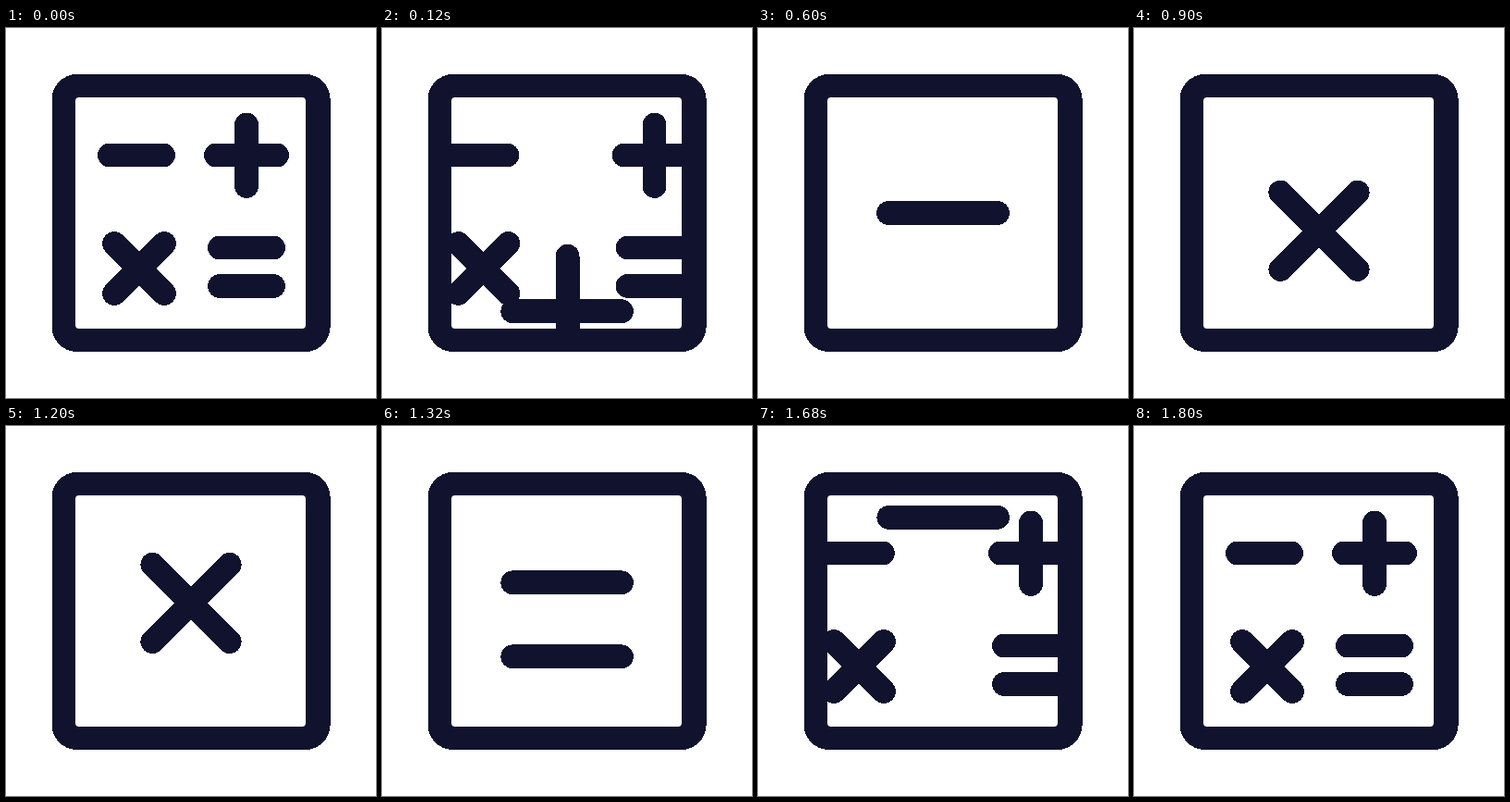
Write an HTML page that moves like this. It is 400 by 400 pixels and loops after 1830 ms.

```html
<!DOCTYPE html>
<html lang="en">
<head>
<meta charset="utf-8">
<title>Calculator icon</title>
<style>
  html, body { margin: 0; width: 100%; height: 100%; overflow: hidden; background: #fff; }
  svg { display: block; width: 100%; height: 100%; shape-rendering: crispEdges; }
  path { fill: none; stroke: #11132e; stroke-width: 25.8; stroke-linecap: round; }
</style>
</head>
<body>
<svg viewBox="0 0 400 400">
  <clipPath id="inside"><rect x="75" y="75" width="249" height="250" rx="4"/></clipPath>
  <rect x="49.6" y="50" width="301" height="300" rx="27" fill="#11132e"/>
  <g clip-path="url(#inside)">
    <rect width="400" height="400" fill="#fff"/>
    <path id="left" d="M112 137.5H170M117 233l54 54M171 233l-54 54"/>
    <path id="right" d="M227 137.5H293M260 104.5V171M231 237.5H289M231 279H289"/>
    <path id="plus" d="M141.3 200.6H259M200.6 141V259"/>
    <path id="minus" d="M141 200H259"/>
    <path id="times" d="M158.3 158.3l83.4 83.4M241.7 158.3l-83.4 83.4"/>
    <path id="equals" d="M141.3 160H259M141.3 240H259"/>
  </g>
</svg>
<script>
const LOOP = 1830, STEP = 30, FAR = 200;

const clamp = x => Math.min(1, Math.max(0, x));
const back = (s, pull) => s * s * ((pull + 1) * s - pull);
const progress = (t, start, span) => clamp((t - start) / span);

// Distance from rest: leaving winds up first, arriving overshoots and settles.
const leave = (t, start, span = 210) =>
  FAR * back(clamp(progress(t, start, span) / 0.601), 1.3);
const arrive = (t, start, span = 210, part = 0.66, pull = 1.2) =>
  FAR * back(clamp((1 - progress(t, start, span)) / part), pull);

function place(id, x, y) {
  document.getElementById(id).setAttribute("transform", `translate(${x} ${y})`);
}

function draw(t) {
  const side = t < 1530 ? leave(t, 30) : arrive(t, 1530, 270, 0.63);
  place("left", -side, 0);
  place("right", side, 0);

  place("plus", 0, t < 390 ? arrive(t, 30) : -leave(t, 390));

  if (t < 780) place("minus", -arrive(t, 390, 210, 0.66, 0), 0);
  else place("minus", 0, leave(t, 780));

  place("times", 0, t < 1170 ? arrive(t, 780) : leave(t, 1170));
  place("equals", 0, t < 1530 ? -arrive(t, 1170) : -leave(t, 1530, 270));
}

const begin = performance.now();
function tick() {
  const t = (performance.now() - begin) % LOOP;
  draw(Math.floor(t / STEP) * STEP);
  requestAnimationFrame(tick);
}
tick();
</script>
</body>
</html>
```
